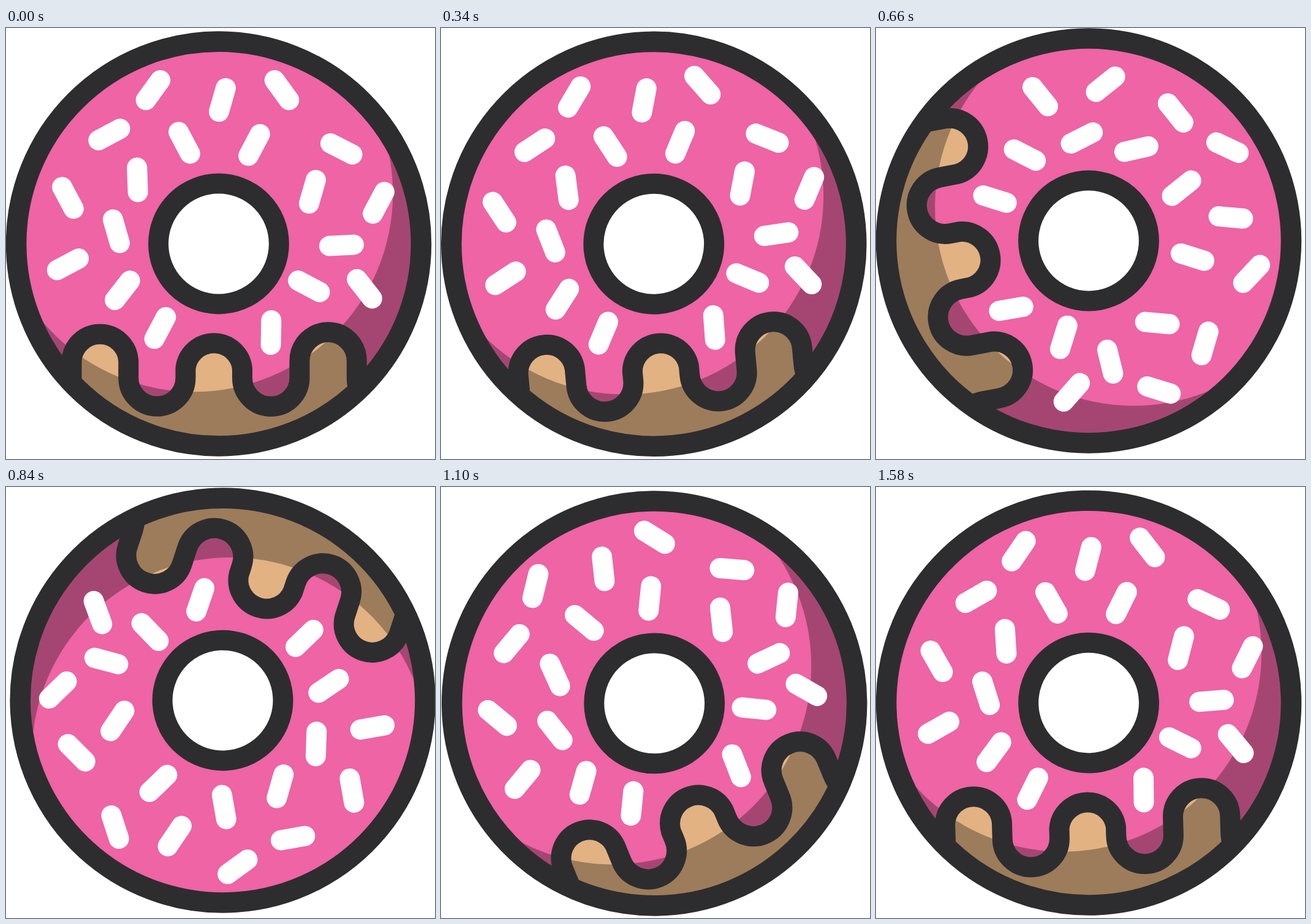
Animation of 700 by 704 pixels, one loop 1600 ms. Source, as an HTML page:

```html
<!DOCTYPE html>
<html lang="en">
<head>
<meta charset="utf-8">
<title>Spinning donut</title>
<style>
  html, body { margin: 0; width: 100%; height: 100%; overflow: hidden; background: #fff; }
  svg { display: block; width: 100%; height: 100%; }
</style>
</head>
<body>
<svg viewBox="0 0 700 704">
  <defs>
    <clipPath id="body"><circle cx="347" cy="352.5" r="322"/></clipPath>
  </defs>
  <g id="donut">
    <g clip-path="url(#body)">
      <path fill="#e2b283" d="M0 0H700V704H0Z"/>
      <path id="icing" fill="#ee64a4"/>
      <path fill="#000" fill-opacity=".305" fill-rule="evenodd"
        d="M-100 -100H800V800H-100Z M-17.3 270a324.3 324.3 0 1 0 648.6 0a324.3 324.3 0 1 0 -648.6 0Z"/>
    </g>
    <g id="sprinkles" stroke="#fff" stroke-width="33" stroke-linecap="round"></g>
    <g fill="none" stroke="#2d2d2f" stroke-width="33">
      <path id="drip"/>
      <circle cx="347" cy="352.5" r="330.4" stroke-width="33.6"/>
      <circle cx="347" cy="352.5" r="98.4" fill="#fff"/>
    </g>
  </g>
</svg>
<script>
const LOOP = 1600, STEP = 20, SPIN = 1560;
const $ = id => document.getElementById(id);

// Wavy lower edge of the icing
const bend = (x, y, sweep) => `V${y}A46.5 46.5 0 0 ${sweep} ${x} ${y}`;
const wave = 'M107 576' + bend(199.8, 543.5, 1) + bend(293, 571.5, 0) +
  bend(385.5, 556.5, 1) + bend(479, 571.5, 0) + bend(572.3, 543.5, 1) +
  'V571Q572.3 580 575 591';
$('drip').setAttribute('d', wave);
$('icing').setAttribute('d', wave + 'L704 591V0H0V576Z');

// Sprinkles: centre x, centre y, tilt in degrees
const sprinkles = [
  [240, 101.5, -54], [353, 117.5, -74], [450, 101.5, 54], [168.5, 174, -28],
  [291, 187.5, 62], [405, 191, -62], [547.3, 197.5, 27], [214.5, 248, 88],
  [101, 277.5, 62], [500, 267.5, -74], [608, 285.5, -62], [180, 332, 74],
  [547.5, 355, -3], [101, 386, -28], [190, 428.5, -52], [494.3, 422, 28],
  [585, 426, 52], [251.5, 490, -62], [432.5, 497.5, -89]
];
$('sprinkles').innerHTML = sprinkles.map(([x, y, a]) =>
  `<path d="M-20 0H20" transform="translate(${x} ${y}) rotate(${a})"/>`).join('');

// Wind-up, spin, overshoot, return: time, angle, speed in degrees per ms
const keys = [
  [0, 0, -.086], [210, -9.8, 0], [340, -5.3, .08], [660, 79.2, .54],
  [840, 198, .7], [960, 280.7, .57], [1280, 364.9, .071],
  [1376, 368.2, 0], [SPIN, 360, -.086]
];

function angleAt(t) {
  t %= SPIN;
  const i = keys.findIndex(k => k[0] > t);
  const [t0, a, va] = keys[i - 1], [t1, b, vb] = keys[i];
  const d = t1 - t0, u = (t - t0) / d, w = 1 - u;
  return a + (b - a) * u * u * (3 - 2 * u) + d * u * w * (va * w - vb * u);
}

function draw(ms) {
  const t = Math.floor(ms % LOOP / STEP) * STEP;
  $('donut').setAttribute('transform', `rotate(${angleAt(t).toFixed(3)} 350 350)`);
}

const start = performance.now();
function tick() {
  draw(performance.now() - start);
  requestAnimationFrame(tick);
}
draw(0);
requestAnimationFrame(tick);
</script>
</body>
</html>
```
